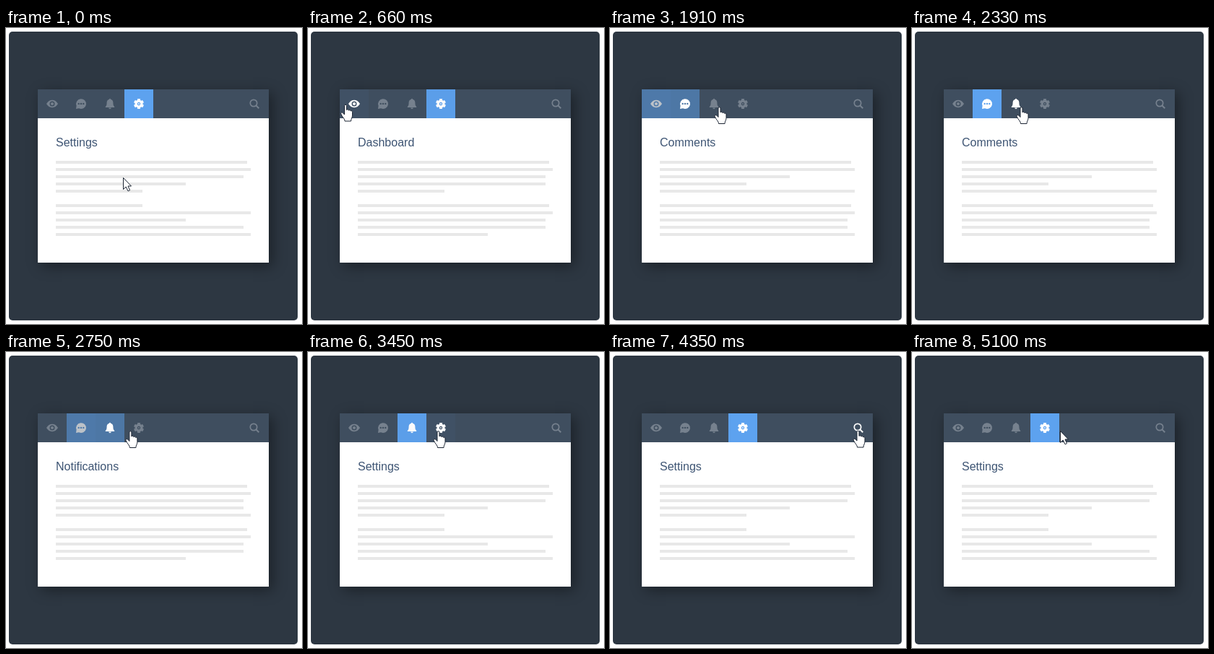
An HTML page for the animation above (5.17 s loop, 410x410 px).

```html
<!DOCTYPE html>
<html lang="en">
<head>
<meta charset="utf-8">
<title>Tab bar</title>
<style>
  html, body { margin: 0; width: 100%; height: 100%; overflow: hidden; background: #fff; }
  svg { display: block; position: absolute; left: 0; top: 0; }
  .panel { position: absolute; left: 44px; top: 85px; width: 320px; height: 240px;
           background: #fff; box-shadow: 5px 5px 18px rgba(0, 0, 0, .4); }
  .card { position: absolute; left: 4px; top: 5px; width: 400px; height: 400px;
          border-radius: 5px; background: #2d3742; }
  text { font: 16px "Liberation Sans", Arial, sans-serif; fill: #3d5473; }
  .icon { fill: currentColor; fill-rule: evenodd; }
  .stroke { fill: none; stroke: currentColor; }
  .cursor { fill: #fff; stroke: #1b2433; stroke-linejoin: round; }
</style>
</head>
<body>
<div class="card"></div>
<div class="panel"></div>
<svg width="410" height="410" viewBox="0 0 410 410">
  <rect x="44" y="85" width="320" height="40" fill="#3f4e5f"/>
  <g id="tabs"></g>

  <g class="icon" transform="translate(64 105)">
    <path d="M-8 0Q-4.800-5.200 0-5.200T8 0Q4.800 5.200 0 5.200T-8 0ZM-3.500 0a3.500 3.500 0 1 0 7 0a3.500 3.500 0 1 0-7 0Z"/>
    <circle r="2.100"/>
  </g>
  <g class="icon" transform="translate(104 105)">
    <path d="M-7 7L-6.400 2.800A7 6.900 0 1 1-3 6.300ZM-4.500-.1a1.200 1.200 0 1 0 2.400 0a1.200 1.200 0 1 0-2.400 0ZM-1.200-.1a1.200 1.200 0 1 0 2.400 0a1.200 1.200 0 1 0-2.400 0ZM2.100-.1a1.200 1.200 0 1 0 2.400 0a1.200 1.200 0 1 0-2.400 0Z"/>
  </g>
  <g class="icon" transform="translate(144 105)">
    <path d="M-1-6.200a1 1 0 0 1 2 0C3.500-5.500 4.400-3.700 4.400-1.500C4.400 1.800 4.900 2.400 6.200 4V5H-6.200V4C-4.900 2.400-4.400 1.800-4.400-1.500C-4.400-3.700-3.500-5.500-1-6.200ZM-1.800 5.600H1.800A1.800 1.600 0 0 1-1.800 5.600Z"/>
  </g>
  <g class="icon" transform="translate(184 105) rotate(30)">
    <circle class="stroke" r="3.900" stroke-width="3.400"/>
    <circle class="stroke" r="5.900" stroke-width="2.400" pathLength="12" stroke-dasharray="1.200 .8" stroke-dashoffset=".6"/>
    <circle r="1"/>
  </g>
  <g class="icon" transform="translate(343 104)">
    <circle class="stroke" r="4.700" stroke-width="1.700"/>
    <path class="stroke" d="M3.400 3.400L7.300 7.300" stroke-width="2"/>
  </g>

  <text id="title" x="69" y="164"></text>
  <path id="lines" stroke="#e8e8e8" stroke-width="4"/>

  <path id="arrow" class="cursor" d="M.5.5V16.500L4.200 13L7 18.800L9.600 17.700L7 12H11.500Z"/>
  <path id="hand" class="cursor" d="M-1.500 1.500C-1.500-.2 1.500-.2 1.500 1.500V7.500C1.900 6.400 4.500 6.600 4.500 8.200C5.200 7.200 7.200 7.400 7.200 9C8 8.300 9.500 8.700 9.500 10.300V15C9.500 18.500 7.500 19.500 7.500 23H-1C-1 20.500-3 18.500-4.800 16L-6.300 13C-7 11-4.800 10.400-3.500 11.800L-1.500 14Z"/>
</svg>
<script>
const LOOP = 5170, STEP = 70, PHASE = 20;
const byId = id => document.getElementById(id);
const clamp = x => Math.min(1, Math.max(0, x));
const smooth = x => x * x * (3 - 2 * x);

// Rows that break off early; all other rows run nearly the full width.
const pages = [
  { title: 'Dashboard', click: 580, narrow: [4], medium: [9] },
  { title: 'Comments', click: 1700, narrow: [3], medium: [2] },
  { title: 'Notifications', click: 2540, narrow: [], medium: [9] },
  { title: 'Settings', click: 3380, narrow: [4, 5], medium: [3, 7] }
];

// The pointer's stops, each with its time of arrival.
const origin = { x: 162, y: 207 };
const stops = [
  { at: 440, x: 52, y: 106 },
  { at: 980, x: 88.5, y: 99.5 },
  { at: 1420, x: 99, y: 101 },
  { at: 1890, x: 151.5, y: 109.5 },
  { at: 2800, x: 180.5, y: 109.5 },
  { at: 4010, x: 322, y: 116 },
  { at: 4290, x: 343.5, y: 109 },
  { at: 5060, x: 205, y: 109 }
];

const buttonLeft = i => 44 + 40 * (i < 4 ? i : 7);
const icons = [...document.querySelectorAll('.icon')];
const tabs = pages.map((_, i) => {
  const rect = document.createElementNS('http://www.w3.org/2000/svg', 'rect');
  const box = { x: buttonLeft(i), y: 85, width: 40, height: 40, fill: '#5da2ef' };
  for (const key in box) rect.setAttribute(key, box[key]);
  return byId('tabs').appendChild(rect);
});

// Longer moves take more time.
function pointerAt(time) {
  let { x, y } = origin;
  for (const stop of stops) {
    const dx = stop.x - x, dy = stop.y - y;
    const duration = 100 + 1.5 * Math.hypot(dx, dy);
    const p = smooth(clamp(1 - (stop.at - time) / duration));
    x += dx * p;
    y += dy * p;
  }
  return { x, y };
}

function isOver(i, { x, y }) {
  const left = buttonLeft(i);
  return y > 85 && y < 125 && x >= left && x < left + 40;
}

// Light follows the pointer as an average over its recent past; tabs react late.
function hoverLight(i, time) {
  const delay = i < 4 ? 140 : 0;
  const past = [0, 35, 70, 105];
  return past.filter(ago => isOver(i, pointerAt(time - delay - ago))).length / past.length;
}

function iconColor(level) {
  const mix = from => Math.round(from + (255 - from) * level);
  return `rgb(${mix(118)}, ${mix(129)}, ${mix(142)})`;
}

function lineWidth({ narrow, medium }, row) {
  if (narrow.includes(row)) return 120;
  if (medium.includes(row)) return 180;
  return 250 + 5 * ((row * row + 3) % 5);
}

function drawPage(page) {
  byId('title').textContent = page.title;
  let path = '';
  for (let row = 0; row < 10; row++) {
    const y = 186 + 10 * (row + (row > 4));
    path += `M69 ${y}h${lineWidth(page, row)}`;
  }
  byId('lines').setAttribute('d', path);
}

function draw(now) {
  const time = Math.max(0, Math.floor((now % LOOP - PHASE) / STEP) * STEP + PHASE);
  const clicked = pages.filter(page => page.click <= time).length;
  const current = (clicked + 3) % 4;
  const previous = (current + 3) % 4;
  const elapsed = clicked ? time - pages[current].click : LOOP;
  const progress = 1 - (1 - clamp((elapsed - 60) / 530)) ** 2;
  const active = i => i === current ? progress : i === previous ? 1 - progress : 0;

  tabs.forEach((tab, i) => tab.setAttribute('opacity', active(i)));
  icons.forEach((icon, i) => {
    icon.style.color = iconColor(Math.max(active(i), hoverLight(i, time)));
  });
  drawPage(pages[current]);

  const pointer = pointerAt(time);
  const shape = icons.some((_, i) => isOver(i, pointer)) ? 'hand' : 'arrow';
  for (const id of ['hand', 'arrow']) byId(id).style.display = id === shape ? '' : 'none';
  byId(shape).setAttribute('transform', `translate(${pointer.x} ${pointer.y})`);
}

const start = performance.now();
function frame() {
  draw(performance.now() - start);
  requestAnimationFrame(frame);
}
frame();
</script>
</body>
</html>
```
